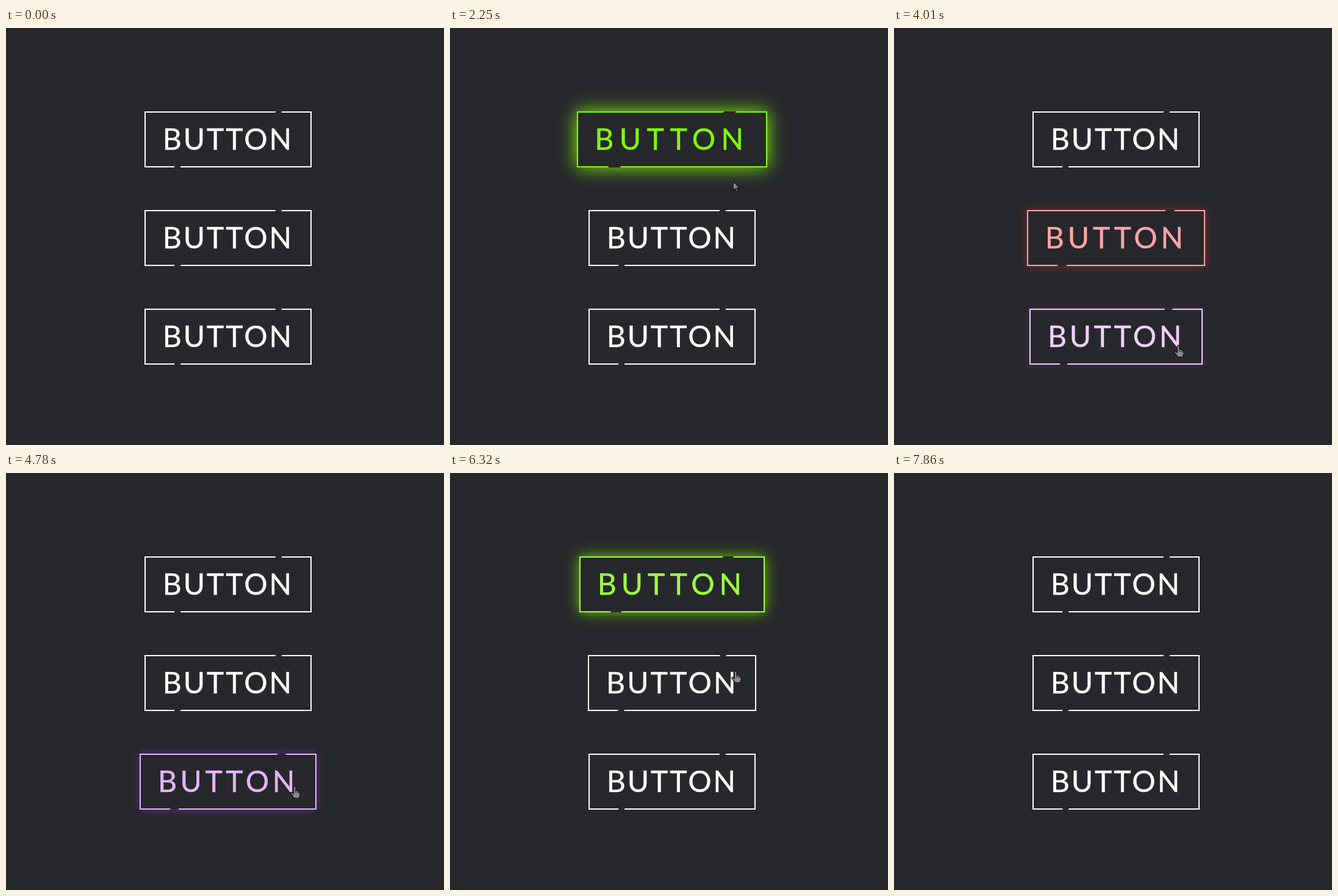
Animation, 718 px wide and 685 px high, one loop 8850 ms. Source, as an HTML page:

```html
<!DOCTYPE html>
<html lang="en">
<head>
<meta charset="utf-8">
<title>Glowing buttons</title>
<style>
  html, body { margin: 0; width: 100%; height: 100%; overflow: hidden; background: #27282c; }
  svg { display: block; }
  text { font: 48px Lato, "Open Sans", sans-serif; stroke-width: .4px; }
</style>
</head>
<body>
<svg width="718" height="685" viewBox="0 0 718 685">
  <g id="buttons"></g>
  <g id="cursor" fill="#8d898b" stroke="#131316" stroke-width="1.2" stroke-linejoin="round">
    <path id="arrow" d="M0 0V14.5L3.3 11.4 5.8 17 8 16 5.7 10.6H10.5Z"/>
    <path id="hand" d="M-1.8 2Q-1.6 .4 0 .4T1.8 2V7Q4.4 5.6 5 8Q7.2 7 7.6 9Q9 8.6 9 10.5V14Q8.6 17 7 19.5H-1Q-3 16 -6.4 12.5Q-7 10.4 -4.6 10.6L-1.8 12.8ZM1.8 7V11M5 8V11.5M7.6 9V12"/>
  </g>
</svg>
<script>
const LOOP = 8850, FADE = 500;
const CENTER = 364, TOP = 137, HEIGHT = 92, PITCH = 162;
const BACKGROUND = '#27282c';
const byId = id => document.getElementById(id);
const mix = (a, b, k) => a + (b - a) * k;
const rowTop = row => TOP + row * PITCH;

// When the pointer is over a button, and where it settles there
const visits = [
  { row: 0, enter: 1205, leave: 2230, x: 477, y: 149 },
  { row: 1, enter: 2285, leave: 3850, x: 443, y: 325 },
  { row: 2, enter: 3925, leave: 4460, x: 466, y: 520 },
  { row: 2, enter: 4700, leave: 4985, x: 473, y: 527 },
  { row: 1, enter: 5060, leave: 5725, x: 475, y: 345 },
  { row: 0, enter: 5762, leave: 6230, x: 471, y: 175 },
  { row: 1, enter: 6294, leave: 6850, x: 468, y: 362 },
  { row: 2, enter: 6915, leave: 7390, x: 490, y: 505 }
];
const start = { t: 440, x: 668, y: 700, row: 3 };
const end = { t: 7730, x: 700, y: 690, row: 3 };

// The pointer crosses the edge that faces the neighbouring stop.
function crossing(t, visit, neighbour) {
  const y = rowTop(visit.row) + (neighbour.row < visit.row ? 0 : HEIGHT);
  return { t, x: mix(visit.x, neighbour.x, .15), y };
}

const path = [start, ...visits.flatMap((v, i) => [
  crossing(v.enter, v, visits[i - 1] || start),
  { t: mix(v.enter, v.leave, .15), x: v.x, y: v.y },
  crossing(v.leave, v, visits[i + 1] || end)
]), end];

function slope(i, axis) {
  if (i < 1 || i > path.length - 2) return 0;
  const rate = k => (path[k + 1][axis] - path[k][axis]) / (path[k + 1].t - path[k].t);
  const a = rate(i - 1), b = rate(i);
  return a * b > 0 ? 2 * a * b / (a + b) : 0;
}

// Monotone cubic interpolation along the path
function pointer(t, axis) {
  const i = path.findIndex(p => p.t > t) - 1;
  const p = path[i], q = path[i + 1], d = q.t - p.t;
  const u = (t - p.t) / d, v = 1 - u;
  return v * v * (1 + 2 * u) * p[axis] + u * u * (3 - 2 * u) * q[axis]
    + d * u * v * (v * slope(i, axis) - u * slope(i + 1, axis));
}

// The CSS "ease" curve: cubic-bezier(.25, .1, .25, 1)
function ease(x) {
  if (x <= 0) return 0;
  if (x >= 1) return 1;
  const bezier = (u, a, b) => 3 * u * (1 - u) ** 2 * a + 3 * u * u * (1 - u) * b + u ** 3;
  let low = 0, high = 1;
  for (let i = 0; i < 24; i++) {
    const mid = (low + high) / 2;
    if (bezier(mid, .25, .25) < x) low = mid; else high = mid;
  }
  return bezier(low, .1, 1);
}

// Each hover change starts a new transition from the current value.
function hoverAmount(row, t) {
  let from = 0, to = 0, since = -FADE;
  const at = time => mix(from, to, ease((time - since) / FADE));
  const change = (time, target) => {
    if (time <= t) [from, to, since] = [at(time), target, time];
  };
  for (const v of visits.filter(v => v.row === row)) {
    change(v.enter, 1);
    change(v.leave, 0);
  }
  return at(t);
}

function set(node, attributes) {
  for (const name in attributes) node.setAttribute(name, attributes[name]);
}

function add(tag, attributes) {
  const node = document.createElementNS('http://www.w3.org/2000/svg', tag);
  set(node, attributes);
  return byId('buttons').appendChild(node);
}

function createButton(color, row) {
  const y = rowTop(row);
  const addGap = () => add('rect', { x: -.5, y: -2, width: 1, height: 4, fill: BACKGROUND });
  const button = {
    color, row, y,
    glow: add('rect', { y, height: HEIGHT, fill: `rgb(${color})` }),
    frame: add('rect', { y: y + 1, height: HEIGHT - 2, fill: BACKGROUND, 'stroke-width': 2 }),
    topGap: addGap(),
    bottomGap: addGap(),
    label: add('text', { y: y + 62.5 })
  };
  button.label.textContent = 'BUTTON';
  return button;
}

const buttons = [[127, 255, 0], [243, 53, 53], [189, 58, 255]].map(createButton);

function drawButton(b, p) {
  const left = Math.round(227 - 20 * p), width = 2 * (CENTER - left);
  const color = `rgb(${b.color.map(c => Math.round(mix(255, c, p)))})`;
  const gap = (x, y) => ({ transform: `translate(${x} ${y}) skewX(-35) scale(${10 + 10 * p} 1)` });

  set(b.glow, { x: left, width, opacity: p });
  b.glow.style.filter = p > .01 ? `blur(${16 * p}px)` : 'none';
  set(b.frame, { x: left + 1, width: width - 2, stroke: color });
  set(b.topGap, gap(left + .8 * width, b.y + 2));
  set(b.bottomGap, gap(left + .2 * width, b.y + HEIGHT - 2));
  set(b.label, { x: 256.7 - 20 * p, fill: color, stroke: color, 'letter-spacing': 3 + 6.67 * p });
}

function drawCursor(t) {
  const visible = t >= start.t && t < end.t;
  byId('cursor').style.display = visible ? '' : 'none';
  if (!visible) return;
  const over = visits.some(v => t >= v.enter && t < v.leave);
  byId('hand').style.display = over ? '' : 'none';
  byId('arrow').style.display = over ? 'none' : '';
  set(byId('cursor'), { transform: `translate(${pointer(t, 'x')} ${pointer(t, 'y')})` });
}

function render(t) {
  for (const b of buttons) drawButton(b, hoverAmount(b.row, t));
  drawCursor(t);
}

const begin = performance.now();
function tick() {
  render((performance.now() - begin) % LOOP);
  requestAnimationFrame(tick);
}
tick();
</script>
</body>
</html>
```
